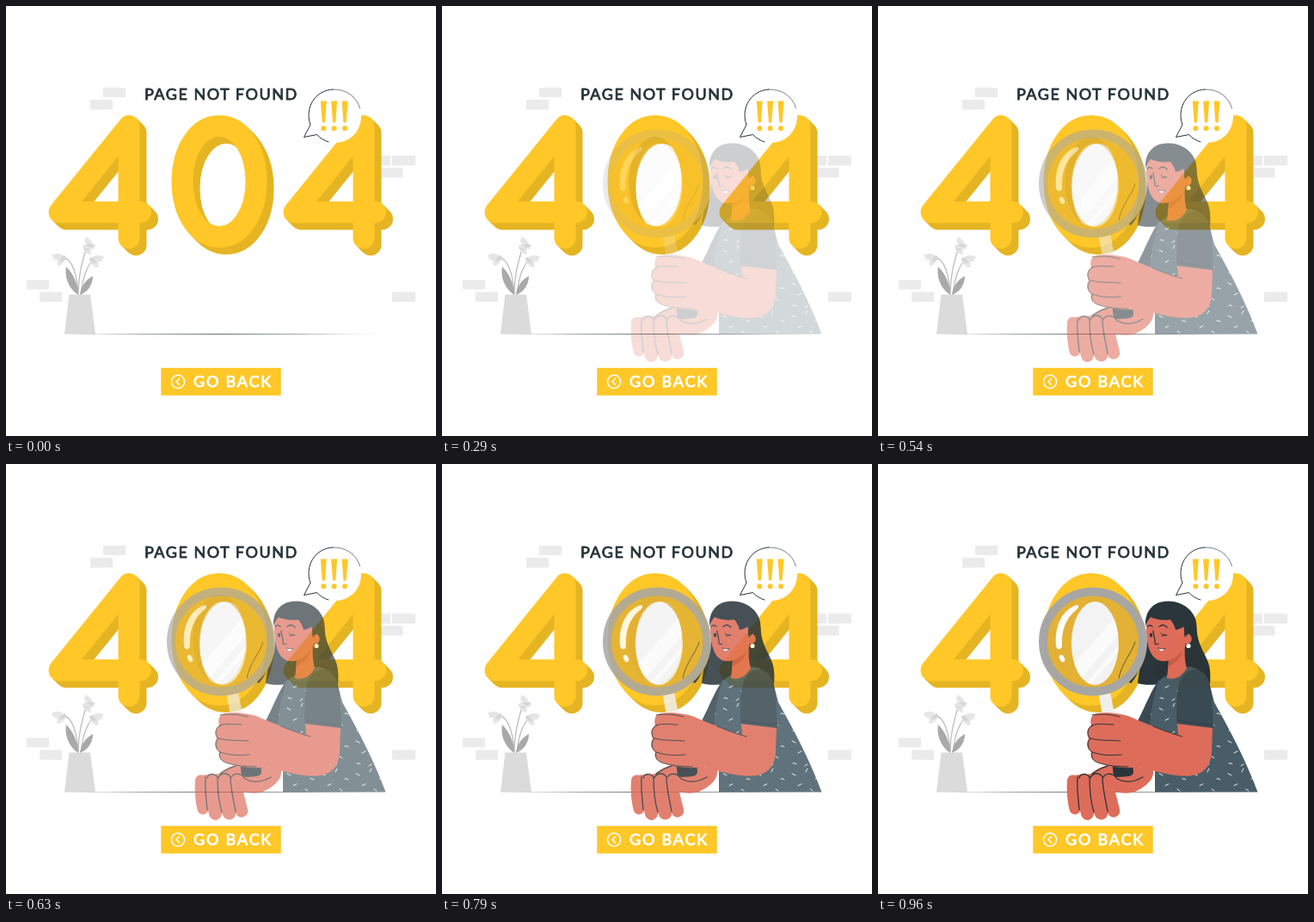
Recreate the animation shown at these times as an HTML page. Size 500 by 500 pixels, loop 1 s.

```html
<!DOCTYPE html>
<html lang="en">
<head>
<meta charset="utf-8">
<title>Page not found</title>
<style>
html, body { margin: 0; width: 100%; height: 100%; overflow: hidden; background: #fff; }
svg { display: block; width: 100vw; height: 100vh; }
text { font-family: Lato, "Open Sans", sans-serif; font-size: 18px; text-anchor: middle; stroke-linejoin: round; }
.digit { fill: none; stroke-width: 25; stroke-linecap: round; stroke-linejoin: round; }
.front { stroke: #ffc727; }
.depth { stroke: #e5b423; }
.ink { fill: none; stroke: #263238; stroke-width: 1; stroke-linecap: round; stroke-linejoin: round; }
.skin { fill: #de6a57; }
.hair { fill: #263238; }
.sleeve { fill: #37474f; }
.brick { fill: #ebebeb; }
.woman { animation: appear 1s cubic-bezier(.38, .17, .62, .83) infinite; }
@keyframes appear { from { opacity: 0; } to { opacity: 1; } }
</style>
</head>
<body>
<svg viewBox="0 0 500 500">
  <defs>
    <path id="four" d="M156.5 239.7H62L143 139.5V269.7"/>
    <path id="zero" d="M248 139.5C272.5 139.5 291 167.5 291 204S272.5 268.5 248 268.5S205 240.5 205 204S223.5 139.5 248 139.5Z"/>
    <g id="fourDepth">
      <use href="#four" x="2" y="2"/><use href="#four" x="4" y="4"/>
      <use href="#four" x="6" y="6"/><use href="#four" x="8" y="8"/>
    </g>
    <g id="zeroDepth">
      <use href="#zero" x="2" y="2"/><use href="#zero" x="4" y="4"/>
      <use href="#zero" x="6" y="6"/><use href="#zero" x="8" y="8"/>
    </g>
    <g id="bloom">
      <path fill="#e6e6e6" d="M0 0C-5-4-11-4-15-1C-13 2-12 3-13 4C-11 4-9 4-8 5C-9 7-9 9-8 11C-5 11-2 9 0 6C2 4 2 2 0 0Z"/>
      <path fill="#d6d6d6" d="M1-1C-3 0-6 3-6 6C-3 6 0 5 2 2Z"/>
    </g>
    <g id="bang">
      <path d="M-3.5 110.5H3.5L1.6 135.5H-1.6Z"/><circle cy="142.2" r="3"/>
    </g>
    <pattern id="dashes" width="40" height="38" patternUnits="userSpaceOnUse" x="322" y="240">
      <rect width="40" height="38" fill="#455a64"/>
      <path fill="none" stroke="#fff" stroke-width=".9" stroke-linecap="round"
        d="M5 6l4 2M21 4l2-4M32 12q2-1 4 1M12 20l4-2M26 24l3 2M6 32q2-1 4 1M20 35l3-2"/>
    </pattern>
    <linearGradient id="floor">
      <stop offset="0" stop-color="#263238" stop-opacity=".45"/>
      <stop offset=".5" stop-color="#263238" stop-opacity=".95"/>
      <stop offset="1" stop-color="#263238" stop-opacity=".3"/>
    </linearGradient>
    <clipPath id="hole"><ellipse cx="252.3" cy="208.5" rx="27.5" ry="48.5"/></clipPath>
  </defs>

  <g class="brick">
    <rect x="113" y="95" width="26" height="11"/><rect x="98" y="109" width="26" height="11.5"/>
    <rect x="421" y="174" width="26" height="11.5"/><rect x="449" y="174" width="27" height="11.5"/>
    <rect x="435" y="188" width="26.5" height="11.5"/><rect x="24" y="318.5" width="26" height="11"/>
    <rect x="39" y="332.5" width="26" height="11.5"/><rect x="449" y="332.5" width="27" height="11.5"/>
  </g>

  <g class="digit">
    <use class="depth" href="#fourDepth"/><use class="front" href="#four"/>
    <use class="depth" href="#zeroDepth"/><use class="front" href="#zero"/>
    <use class="depth" href="#fourDepth" x="273"/><use class="front" href="#four" x="273"/>
  </g>

  <!-- vase -->
  <g fill="none" stroke="#bdbdbd" stroke-width="1.3">
    <path d="M84 336C83 315 78 293 65 292M84 336C84 314 88 300 93 283M87 336C89 314 96 297 105 293"/>
  </g>
  <path fill="#a9a9a9" d="M84 336C72 328 68 314 70 303C78 311 84 323 84 336ZM86 336C87 326 93 318 101 314C101 323 96 332 86 336Z"/>
  <use href="#bloom" transform="translate(68 291)"/>
  <use href="#bloom" transform="translate(91 279) scale(-.9 .9)"/>
  <use href="#bloom" transform="translate(101 278) rotate(42) scale(.85)"/>
  <use href="#bloom" transform="translate(99 293) scale(-1 1)"/>
  <path fill="#dbdbdb" d="M73.5 335.5H98L104 381.5H68Z"/>
  <path fill="url(#floor)" d="M66 381.3Q250 380.5 437 381.3Q250 382.3 66 381.3Z"/>

  <text x="250.3" y="108.6" fill="#263238" stroke="#263238" stroke-width=".8" letter-spacing="1.53">PAGE NOT FOUND</text>

  <rect x="180.2" y="420.8" width="139.5" height="32" fill="#ffc727"/>
  <g fill="none" stroke="#fff" stroke-width="1.5" stroke-linecap="round" stroke-linejoin="round">
    <circle cx="200" cy="436.8" r="7.6"/><path d="M201.6 433.2L198 436.8L201.6 440.4"/>
  </g>
  <text x="264" y="443.4" fill="#fff" stroke="#fff" stroke-width=".9" letter-spacing="1.8">GO BACK</text>

  <g class="woman">
    <!-- hair behind -->
    <path class="hair" d="M315 196C309 215 304 235 302 255C312 258 328 258 345 250L340 215Z"/>
    <path class="hair" d="M300 206C294 220 282 229 278 254C283 247 290 252 294 255C302 247 308 230 309 212Z"/>
    <path class="hair" d="M350 172C367 175 371 186 371 196C373 215 385 225 386 240C387 252 386 258 384 264C378 248 364 240 354 236Z"/>

    <!-- dress -->
    <path fill="url(#dashes)" d="M326 252C335 247 342 241 348 236.5L364 236C377 240 383 245 386 258L391 277C409 309 428 345 441.5 381.5H322V310L302 299C311 282 317 264 326 252Z"/>
    <path class="sleeve" d="M327 252C317 264 311 282 302 299L316 305C317 290 320 270 327 252Z"/>
    <path class="sleeve" d="M349 263C350 245 363 236 374 240C383 245 386 255 388 268L390 307C377 307 362 305 348 302Z"/>
    <path class="ink" style="stroke-width:.6" d="M349 263C347 280 348 292 348 302M349 298C363 301 377 303 390 303"/>

    <!-- neck and face -->
    <path class="skin" d="M338 220L357 211C356 222 357 230 359 237C355 246 345 252 336 249C337 240 338 230 338 220Z"/>
    <path fill="#c95847" d="M338 228C346 225 352 220 355 215C353 225 346 232 338 235Z"/>
    <path class="skin" d="M313 176C311 195 312 210 318 221C323 229 331 231 339 228C350 224 356 216 358 209C365 210 367 202 362 198C358 197 357 200 356 202C358 184 350 174 336 172C325 171 315 172 313 176Z"/>
    <path class="hair" d="M311 189C310 173 318 163 329 160.5C344 157 359 163 366 174C371 181 371 190 370 197C367 195 360 195 358 202C357 197 358 192 358 187C355 190 351 192 346 193C345 188 343 185 340 181C332 182 323 181 317 178C314 181 312 185 311 189Z"/>
    <path class="ink" style="stroke-width:1.3" d="M320 194C320 200 323 204 322 208C322 210 324 210 326 209M313 189q3-3 6 0M327 189q5-4 9 1"/>
    <path class="ink" d="M329 197q3 3 7 2M330 200l5-1M326 214q4 2 8 1"/>
    <ellipse class="hair" cx="317.5" cy="199" rx="1.7" ry="2.4"/>
    <path fill="#fff" d="M327 214.5Q330 215.8 333 215.3Q331 218.2 328 217Z"/>
    <circle cx="361" cy="211.5" r="2.6" fill="#fff"/>
    <path class="ink" d="M365 195C368 213 380 221 384 237" stroke="#455a64"/>

    <!-- resting hand -->
    <path class="skin" d="M221 366C229 359 240 362 248 360C257 352 267 349 280 349L320 354C322 366 313 374 301 380C293 384 282 383 276 381C263 383 244 381 230 381Z"/>
    <g fill="none" stroke="#de6a57" stroke-linecap="round">
      <path stroke-width="13" d="M226.5 368Q225 385 229 401"/>
      <path stroke-width="15" d="M239 369Q239 391 243.5 406.5"/>
      <path stroke-width="16" d="M253 368Q255 391 259.5 405.5"/>
      <path stroke-width="14.5" d="M265 368Q270 387 274 403.5"/>
    </g>
    <path class="ink" style="stroke-width:1.3" d="M232 364C231 378 233 390 234 402M234 365C235 360 242 359 246 364C246 380 247 392 251 405M247 365C250 358 258 359 261 364C261 378 265 392 267 404M262 364C266 358 275 360 278 366C287 371 296 371 308 364M249 360C255 356 260 353 267 351"/>

    <!-- magnifier -->
    <path fill="#f0f0f0" d="M256.5 267L270 265L276 296L262 298Z"/>
    <path class="hair" d="M272 345L296 345L297 359Q296 363 288 363.5L279 364Q274 363 273.5 359Z"/>
    <circle cx="250" cy="206.5" r="55" fill="#e2b136"/>
    <g clip-path="url(#hole)">
      <path fill="#f3f3f3" d="M220 155H285V262H220Z"/>
      <path fill="#fff" opacity=".7" d="M220 242L285 168V192L232 254ZM240 257L285 205V212L246 257Z"/>
    </g>
    <circle cx="250" cy="206.5" r="58" fill="none" stroke="#a6a6a6" stroke-width="10"/>
    <path fill="#fff" d="M231 164C215 169 205 187 207 211C207 216 213 217 214 212C213 194 218 180 230 170C234 167 234 164 231 164Z"/>
    <ellipse cx="214" cy="226" rx="2.8" ry="4.5" fill="#fff" transform="rotate(-25 214 226)"/>
    <path class="ink" style="stroke-width:.7" d="M299 207C294 222 284 230 280 249"/>

    <!-- holding arm -->
    <path class="skin" d="M348 302L389 307L388 335C387 351 379 361 363 362.5C343 364 322 357 304 352C288 355 270 352 259 348C249 346 246 340 248 335C242 330 242 324 245 319C242 313 243 307 248 304C246 297 248 291 255 290C266 288 281 290 291 293C309 301 329 309 349 315Z"/>
    <path class="ink" d="M249 292C257 290 272 291 281 294M248 304C257 301 266 303 274 303M246 319C242 313 244 306 250 304M247 319C258 322 270 321 282 322M247 319C242 325 244 332 249 335C260 339 271 339 283 338M249 335C247 341 250 346 258 348C268 351 279 352 291 352M320 305C330 309 340 313 354 317"/>
  </g>

  <!-- speech bubble -->
  <path fill="#fff" d="M351.5 128C351 110 364 97 382 97C400 97 413 110 413 128C413 146 400 159 382 159C374 159 367 156 362 150L346.5 152.5L354 138C352 135 351.5 131 351.5 128Z"/>
  <path class="ink" d="M375 158C370 156.5 365 153.5 361.5 149.5L346.5 152.5L354 138C347 119 359 98 380 97"/>
  <path class="ink" style="stroke-width:.6" d="M380 97C395 96.5 408 105 411.5 119"/>
  <g fill="#ffc727">
    <use href="#bang" x="369.3"/><use href="#bang" x="381.6"/><use href="#bang" x="394"/>
  </g>
</svg>
</body>
</html>
```
